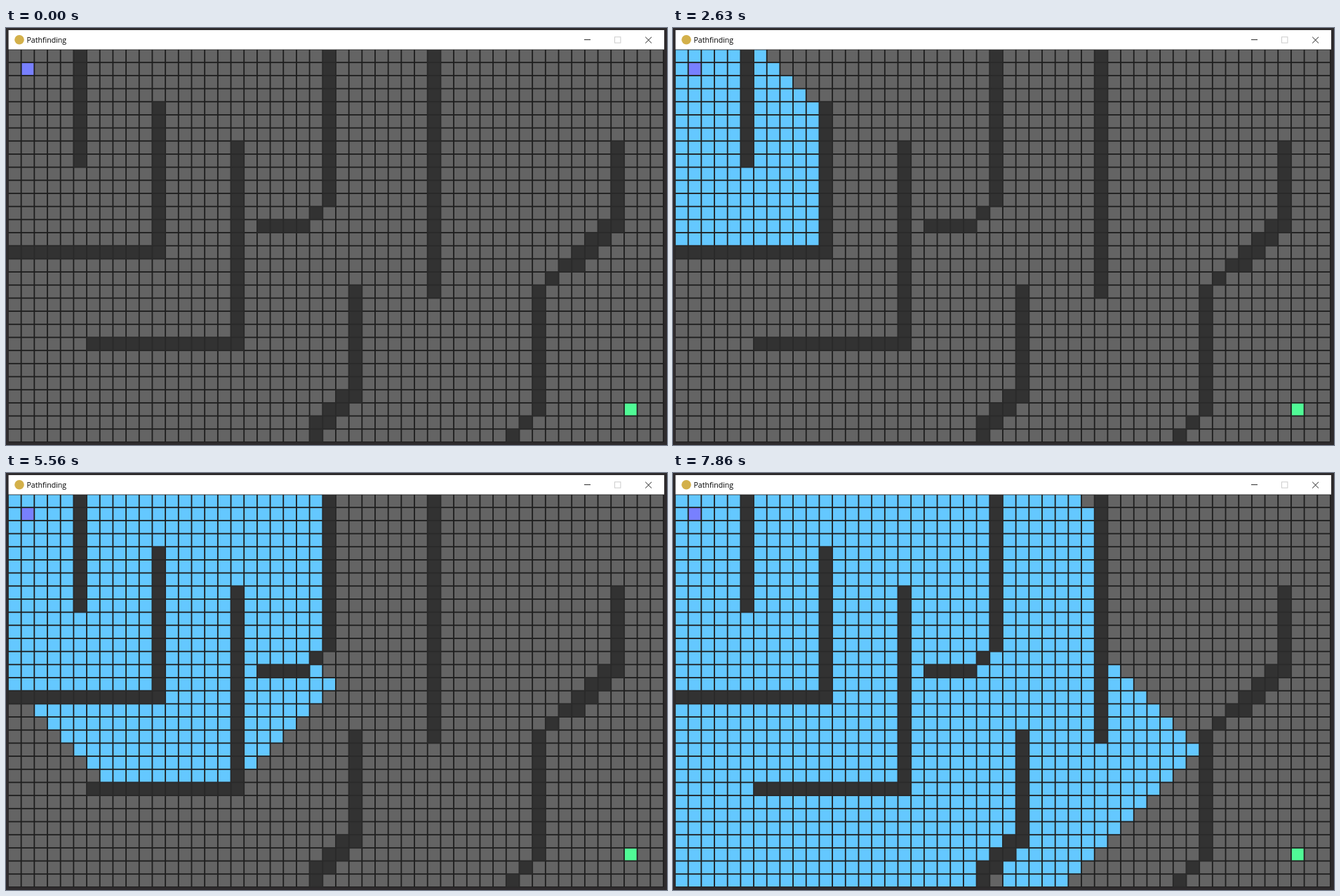
Animation of 942x595 px, one loop 7990 ms. Source, as an HTML page:

```html
<!DOCTYPE html>
<html lang="en">
<head>
<meta charset="utf-8">
<title>Pathfinding</title>
<style>
  html, body { margin: 0; width: 100%; height: 100%; overflow: hidden; background: #2e2b2d; }
  svg { display: block; width: 942px; height: 595px; }
  text { font: 10.6px "Open Sans", "Noto Sans", sans-serif; fill: #000; }
</style>
</head>
<body>
<svg viewBox="0 0 942 595">
  <rect width="942" height="595" fill="#2e2b2d"/>
  <rect x="3.5" y="30" width="934" height="561" fill="#1e1e1e"/>
  <g id="walls"></g>
  <g id="cells"></g>
  <rect x="3.6" y="3" width="934.4" height="27.6" fill="#fff"/>
  <circle cx="19" cy="16.7" r="6.8" fill="#d3b04a"/>
  <text x="29.4" y="20.8">Pathfinding</text>
  <g fill="none" stroke="#222">
    <path d="M824 16.7h9"/>
    <rect x="867.5" y="12.8" width="8.4" height="8.4" stroke="#ccc"/>
    <path d="M911.2 12.8l8.8 8.8m0-8.8l-8.8 8.8"/>
  </g>
</svg>
<script>
const COLS = 50, ROWS = 30, LOOP = 7990, LAST = 68;
const PITCH = 18.68, SIZE = 16.85, LEFT = 3.87, TOP = 31.42;
const COLOR = { free: '#646464', wall: '#323232', seen: '#64c8ff', start: '#7880ff', goal: '#50fa96', seam: '#2a2a2a' };
const at = (c, r) => r * COLS + c;
const START = at(1, 1), GOAL = at(47, 27);

// Walls are pen strokes: D down, L left, Z diagonal, S stair (left, then down)
const MOVES = { D: [[0, 1]], L: [[-1, 0]], Z: [[-1, 1]], S: [[-1, 0], [0, 1]] };
const walls = new Set();
function stroke(c, r, path) {
  walls.add(at(c, r));
  for (const [, move, count] of path.matchAll(/([DLZS])(\d+)/g))
    for (let k = 0; k < count; k++)
      for (const [dc, dr] of MOVES[move]) walls.add(at(c += dc, r += dr));
}
stroke(5, 0, 'D8');
stroke(11, 4, 'D11 L11');
stroke(17, 7, 'D15 L11');
stroke(24, 0, 'D11 Z2 L3');
stroke(32, 0, 'D18');
stroke(26, 18, 'D8 S3');
stroke(46, 7, 'D6 S3 L1 Z2 D9 Z2');

// Breadth-first distances from the start cell
function distances() {
  const dist = new Array(COLS * ROWS).fill(Infinity);
  const queue = [START];
  dist[START] = 0;
  for (const i of queue) {
    const c = i % COLS, r = Math.floor(i / COLS);
    for (const [dc, dr] of [[1, 0], [-1, 0], [0, 1], [0, -1]]) {
      const x = c + dc, y = r + dr, n = at(x, y);
      if (x < 0 || y < 0 || x >= COLS || y >= ROWS || walls.has(n) || dist[n] < Infinity) continue;
      dist[n] = dist[i] + 1;
      queue.push(n);
    }
  }
  return dist;
}
const dist = distances();

// Steps keep a 130, 70, 130, 130 ms rhythm that restarts at [step, time]
const RESTARTS = [[1, 200], [30, 3490], [31, 3640], [42, 4900]];
function stepTime(step) {
  const [first, begin] = RESTARTS.filter(p => p[0] <= step).pop();
  let t = begin;
  for (let k = 0; k < step - first; k++) t += k % 4 === 1 ? 70 : 130;
  return t;
}
const times = Array.from({ length: LAST }, (_, k) => stepTime(k + 1));

function addRect(parent, i, grow, fill) {
  const el = document.createElementNS('http://www.w3.org/2000/svg', 'rect');
  const side = SIZE + 2 * grow;
  const attrs = {
    x: LEFT + (i % COLS) * PITCH - grow,
    y: TOP + Math.floor(i / COLS) * PITCH - grow,
    width: side, height: side, fill
  };
  for (const key in attrs) el.setAttribute(key, attrs[key]);
  parent.appendChild(el);
  return el;
}

function baseColor(i) {
  if (walls.has(i)) return COLOR.wall;
  return i === START ? COLOR.start : i === GOAL ? COLOR.goal : COLOR.free;
}

const wallLayer = document.getElementById('walls');
const cellLayer = document.getElementById('cells');
for (const i of walls) addRect(wallLayer, i, 1.6, COLOR.seam);
const cells = dist.map((_, i) => addRect(cellLayer, i, 0, baseColor(i)));

let shown = 0;
function draw(time) {
  const t = time % LOOP;
  const step = times.filter(s => s <= t).length;
  if (step === shown) return;
  shown = step;
  cells.forEach((el, i) => {
    const seen = i !== START && dist[i] <= step;
    el.setAttribute('fill', seen ? COLOR.seen : baseColor(i));
  });
}

function tick() {
  draw(performance.now());
  requestAnimationFrame(tick);
}
tick();
</script>
</body>
</html>
```
